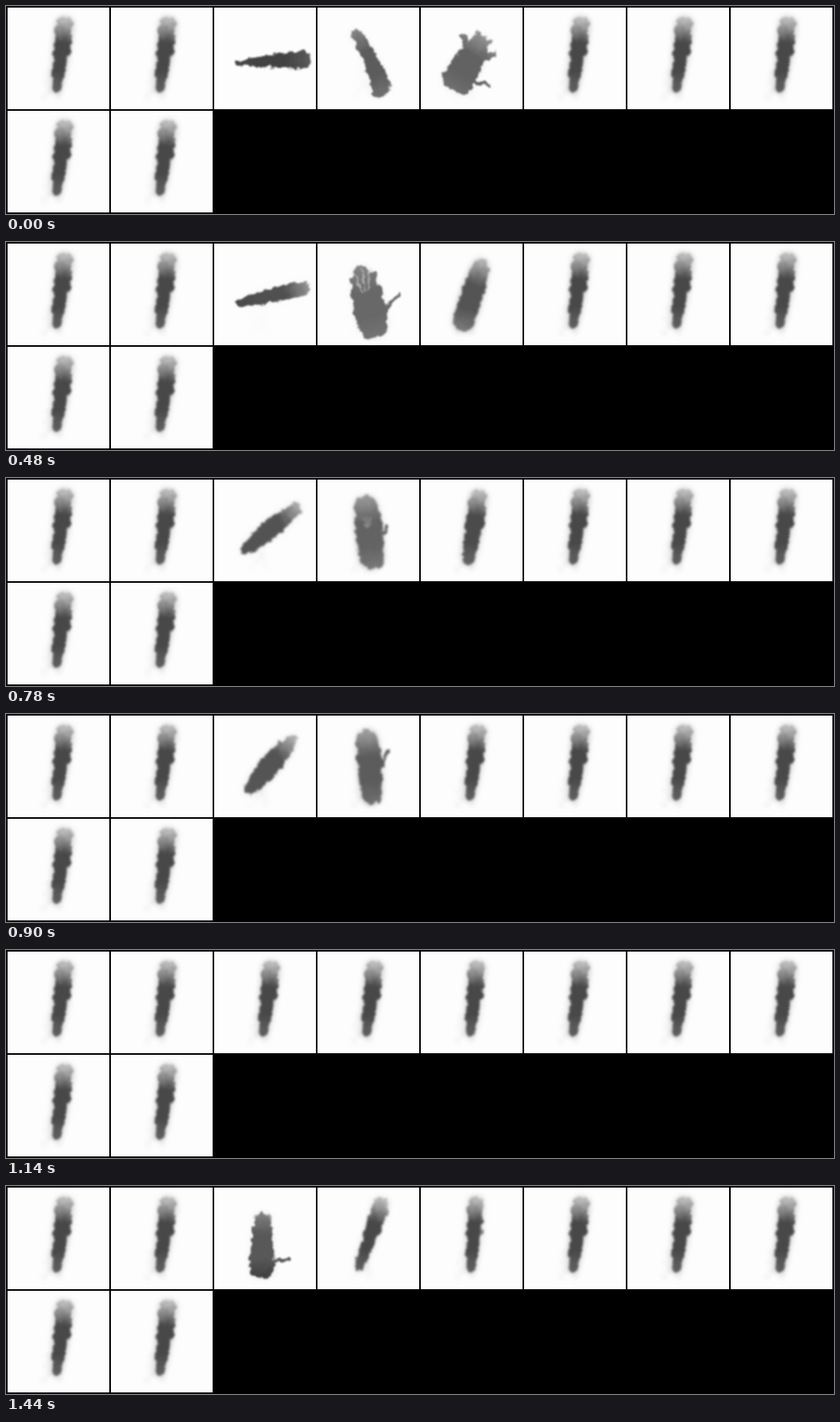
An HTML page for the animation above (1500 ms loop, 1042x262 px).

```html
<!DOCTYPE html>
<html lang="en">
<head>
<meta charset="utf-8">
<title>Hand grid</title>
<style>
html, body { margin: 0; width: 100%; height: 100%; overflow: hidden; background: #000; }
svg { display: block; width: 100vw; height: 100vh; }
</style>
</head>
<body>
<svg id="stage" viewBox="0 0 1042 262"></svg>
<script>
const STEP = 60, STEPS = 25, SIZE = 128, PITCH = 130, COLUMNS = 8, CELLS = 10;
const FAN = [-1, -1 / 3, 1 / 3, 1];
const stage = document.getElementById('stage');

function set(node, attrs) {
  for (const key in attrs) node.setAttribute(key, attrs[key]);
}
function add(parent, tag, attrs = {}) {
  const node = document.createElementNS('http://www.w3.org/2000/svg', tag);
  set(node, attrs);
  return parent.appendChild(node);
}
function mix(a, b, k) {
  return Array.isArray(a) ? a.map((v, i) => mix(v, b[i], k)) : a + (b - a) * k;
}
function random(seed) {
  return () => (seed = seed * 16807 % 2147483647) / 2147483647;
}
const grey = v => `rgb(${[v, v, v].map(Math.round)})`;

// An upright hand seen edge-on; every pose is a variation of it.
// width: half widths at tip, middle and top; tone: greys at top, core and tip.
// thumb and reach are lengths; thumbAngle and spread are degrees off the axis.
const REST = {
  tip: [61, 107], top: [73, 12], bend: 0, width: [5, 9.5, 10.5], tone: [185, 72, 98],
  blur: 1.7, haze: 1, thumb: 0, thumbAngle: 60, reach: 0, spread: 20, crease: 0
};
const pose = (step, change = {}) => ({ step, ...REST, ...change });

const tilting = [
  pose(0, { tip: [25, 70], top: [122, 65], width: [3, 8, 11.5], tone: [88, 66, 72], blur: 0.8, haze: 0 }),
  pose(8, { tip: [27, 76], top: [121, 54], width: [4, 9, 8], tone: [145, 80, 72], blur: 1.1, haze: 0.1 }),
  pose(11, { tip: [30, 85], top: [115, 37], width: [5, 10.5, 7], tone: [160, 82, 78], haze: 0.2 }),
  pose(15, { tip: [40, 98], top: [102, 26], width: [6, 13, 5], tone: [175, 84, 88], haze: 0.4 }),
  pose(19),
  pose(24, { tip: [60, 114], top: [61, 31], width: [16, 14, 8], tone: [125, 88, 62], blur: 1.3,
    haze: 0.3, thumb: 34, thumbAngle: 75, reach: 30, spread: 24 })
];

const opening = [
  pose(0, { tip: [82, 111], top: [45, 29], bend: 5, width: [14, 9.5, 7.5], tone: [130, 92, 112],
    blur: 1.3, haze: 0.2 }),
  pose(4, { tip: [77, 115], top: [50, 29], width: [15, 15, 8], tone: [125, 94, 105], blur: 1.4,
    haze: 0.3, thumb: 37, thumbAngle: 63 }),
  pose(8, { tip: [74, 119], top: [54, 28], width: [14, 20, 8], tone: [130, 104, 116], blur: 1.3,
    haze: 0.3, thumb: 50, thumbAngle: 54, reach: 43, spread: 23, crease: 0.6 }),
  pose(11, { tip: [71, 113], top: [57, 24], width: [15, 19, 12], tone: [140, 106, 128], blur: 1.5,
    haze: 0.8, thumb: 30, thumbAngle: 45, reach: 40, spread: 24, crease: 0.7 }),
  pose(15, { tip: [69, 112], top: [62, 18], width: [10, 15, 11], tone: [155, 92, 112], blur: 1.6,
    thumb: 53, thumbAngle: 28 }),
  pose(19),
  pose(24, { tip: [51, 105], top: [83, 13], width: [5.5, 9, 10], haze: 0.5 })
];

const closing = [
  pose(0, { tip: [39, 104], top: [80, 36], width: [18, 18, 8], tone: [145, 98, 112], blur: 1.2,
    haze: 0.3, thumb: 41, thumbAngle: 69, reach: 42, spread: 40 }),
  pose(4, { tip: [41, 106], top: [81, 26], width: [15, 15, 10], tone: [150, 96, 128], blur: 1.4,
    haze: 0.4, thumb: 34, thumbAngle: 65, reach: 34, spread: 32 }),
  pose(8, { tip: [50, 110], top: [78, 20], width: [12, 14, 9], tone: [175, 84, 125], haze: 0.9 }),
  pose(11, { tip: [57, 108], top: [75, 15], width: [8, 12, 10], tone: [180, 78, 105] }),
  pose(15),
  pose(24, { tip: [63, 107], top: [70, 11], width: [5, 9, 9], haze: 0.8 })
];

// Axis of the hand, with a function from (position, sideways offset) to a point.
function axis({ tip, top, bend }) {
  const dx = top[0] - tip[0], dy = top[1] - tip[1], length = Math.hypot(dx, dy);
  const at = (u, side = 0) => {
    const off = (bend * 4 * u * (1 - u) + side) / length;
    return [tip[0] + dx * u - dy * off, tip[1] + dy * u + dx * off];
  };
  return { at, angle: Math.atan2(dy, dx) };
}

function outline({ width: [a, b, c] }, at) {
  const left = [], right = [], n = 24;
  for (let i = 0; i <= n; i++) {
    const u = (1 - Math.cos(Math.PI * i / n)) / 2;
    const girth = a * (1 - u) * (1 - 2 * u) + 4 * b * u * (1 - u) + c * u * (2 * u - 1);
    const half = girth * Math.sqrt(1 - Math.abs(2 * u - 1) ** 14);
    left.push(at(u, -half));
    right.unshift(at(u, half));
  }
  return [...left, ...right].join(' ');
}

function ray([x, y], angle, from, to) {
  const c = Math.cos(angle), s = Math.sin(angle);
  return `M${x + c * from} ${y + s * from}L${x + c * to} ${y + s * to}`;
}

function makeCell(_, index) {
  const svg = add(stage, 'svg', {
    x: 2 + index % COLUMNS * PITCH, y: 2 + Math.floor(index / COLUMNS) * PITCH,
    width: SIZE, height: SIZE, viewBox: `0 0 ${SIZE} ${SIZE}`
  });
  const defs = add(svg, 'defs');
  const filter = name => add(defs, 'filter', {
    id: name + index, x: 0, y: 0, width: SIZE, height: SIZE, filterUnits: 'userSpaceOnUse',
    'color-interpolation-filters': 'sRGB'
  });
  const rough = filter('rough');
  add(rough, 'feTurbulence', { type: 'fractalNoise', baseFrequency: 0.13, numOctaves: 2, seed: 4, result: 'noise' });
  add(rough, 'feDisplacementMap', {
    in: 'SourceGraphic', in2: 'noise', scale: 9, xChannelSelector: 'R', yChannelSelector: 'G'
  });
  const blur = add(rough, 'feGaussianBlur');
  add(filter('haze'), 'feGaussianBlur', { stdDeviation: 3 });
  const shade = add(defs, 'linearGradient', { id: 'shade' + index, gradientUnits: 'userSpaceOnUse' });
  const stops = [0.04, 0.34, 0.7, 1].map(offset => add(shade, 'stop', { offset }));

  add(svg, 'rect', { width: SIZE, height: SIZE, fill: '#fdfdfd' });
  const haze = add(add(svg, 'g', { filter: `url(#haze${index})`, fill: '#777' }), 'g');
  const halo = add(haze, 'polygon', { opacity: 0.28, stroke: '#777', 'stroke-width': 4 });
  const rnd = random(7);
  for (let i = 0; i < 16; i++) {
    add(haze, 'circle', { cx: 46 + 20 * rnd(), cy: 72 + 44 * rnd(), r: 3, opacity: 0.12 });
  }
  const paint = `url(#shade${index})`;
  const body = add(svg, 'g', { filter: `url(#rough${index})`, fill: 'none', 'stroke-linecap': 'round' });
  const shape = add(body, 'polygon', { fill: paint });
  const fingers = add(body, 'path', { stroke: paint, 'stroke-width': 7 });
  const thumb = add(body, 'path', { stroke: paint, 'stroke-width': 4.5 });
  const creases = add(body, 'path', { stroke: '#ddd', 'stroke-width': 2 });
  return { blur, shade, stops, haze, halo, shape, fingers, thumb, creases };
}

function drawCell(cell, p) {
  const { at, angle } = axis(p);
  const points = outline(p, at);
  const radians = Math.PI / 180;
  const palm = at(0.5);
  const fan = t => angle + t * p.spread * radians;
  set(cell.shape, { points });
  set(cell.halo, { points });
  set(cell.haze, { opacity: p.haze });
  set(cell.blur, { stdDeviation: p.blur });
  set(cell.shade, { x1: p.top[0], y1: p.top[1], x2: p.tip[0], y2: p.tip[1] });
  const [head, core, tail] = p.tone;
  [head, core, core, tail].forEach((v, i) => set(cell.stops[i], { 'stop-color': grey(v) }));
  set(cell.fingers, { d: p.reach ? FAN.map(t => ray(palm, fan(t), 0, p.reach * (1 - 0.2 * Math.abs(t)))).join('') : '' });
  set(cell.thumb, { d: p.thumb ? ray(at(0.2), angle + p.thumbAngle * radians, 0, p.thumb) : '' });
  set(cell.creases, {
    d: [-2 / 3, 0, 2 / 3].map(t => ray(palm, fan(t), p.reach * 0.35, p.reach)).join(''),
    opacity: p.crease
  });
}

function poseAt(poses, step) {
  const i = poses.findIndex(p => p.step >= step);
  const to = poses[i], from = poses[Math.max(0, i - 1)];
  const k = to === from ? 0 : (step - from.step) / (to.step - from.step);
  return Object.fromEntries(Object.keys(to).map(key => [key, mix(from[key], to[key], k)]));
}

const cells = Array.from({ length: CELLS }, makeCell);
cells.forEach(cell => drawCell(cell, REST));
const moving = [[cells[2], tilting], [cells[3], opening], [cells[4], closing]];

let shown = -1;
function tick() {
  const step = Math.floor(performance.now() / STEP) % STEPS;
  if (step !== shown) {
    shown = step;
    for (const [cell, poses] of moving) drawCell(cell, poseAt(poses, step));
  }
  requestAnimationFrame(tick);
}
tick();
</script>
</body>
</html>
```
